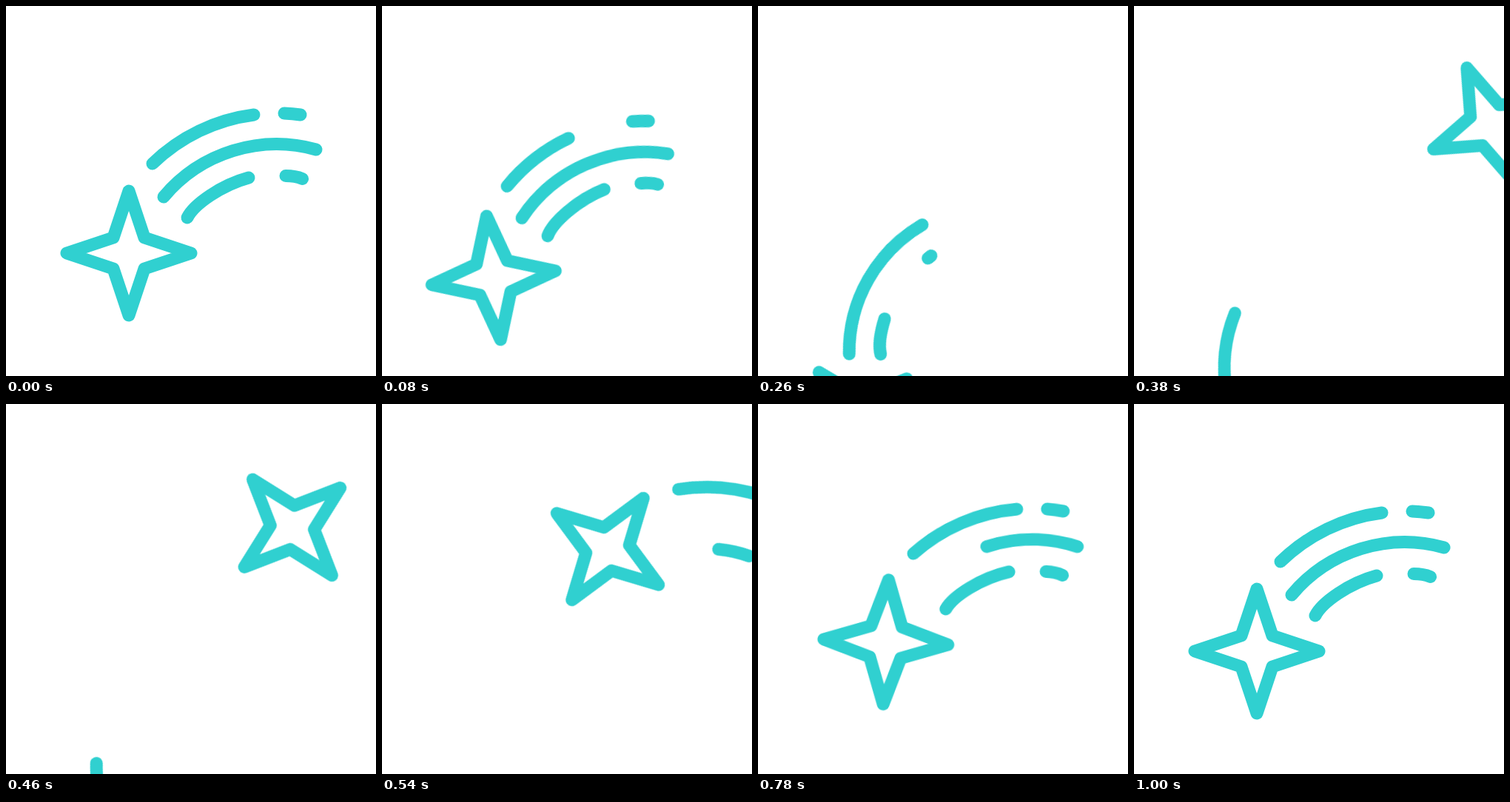
These frames come from a looping animation (500 px wide and 500 px high, 2000 ms). An HTML page:

```html
<!DOCTYPE html>
<html lang="en">
<head>
<meta charset="utf-8">
<title>Shooting star</title>
<style>
  html, body { margin: 0; width: 100%; height: 100%; overflow: hidden; background: #fff; }
  svg { display: block; width: 100%; height: 100%; }

  g, use {
    animation: 2s cubic-bezier(.333, 0, .667, 1) infinite;
  }
  g {
    transform-origin: 454px 485px;
    fill: none;
    stroke: #30d0d0;
    stroke-width: 17;
    stroke-linecap: round;
    stroke-linejoin: round;
  }
  /* One unit dash per path; the long gap lets a trail vanish completely. */
  .trail { stroke-dasharray: 1 2; }

  .leaving { animation-name: leave; }
  .leaving .outer { animation-name: leave-outer; }
  .leaving .outer-dash { animation-name: leave-outer-dash; }
  .leaving .inner { animation-name: leave-inner; }
  .leaving .inner-dash { animation-name: leave-inner-dash; }
  .leaving .middle { animation-name: leave-middle; }

  .arriving {
    animation-name: arrive;
    animation-timing-function: cubic-bezier(0, 0, .643, 1);
  }
  .arriving .outer { animation-name: arrive-outer; }
  .arriving .inner { animation-name: arrive-inner; }
  .arriving .middle {
    animation-name: arrive-middle;
    animation-timing-function: cubic-bezier(.35, 0, .565, 1);
  }

  @keyframes leave { 0% { transform: rotate(0deg); } 18%, 100% { transform: rotate(-50deg); } }
  @keyframes leave-outer { 0% { stroke-dashoffset: 0; } 11%, 100% { stroke-dashoffset: 1.02; } }
  @keyframes leave-outer-dash { 0%, 8% { stroke-dashoffset: 0; } 13%, 100% { stroke-dashoffset: 1.02; } }
  @keyframes leave-inner { 0%, 8% { stroke-dashoffset: 0; } 18%, 100% { stroke-dashoffset: 1.02; } }
  @keyframes leave-inner-dash { 0%, 9% { stroke-dashoffset: 0; } 15%, 100% { stroke-dashoffset: 1.02; } }
  @keyframes leave-middle { 0%, 10% { stroke-dashoffset: 0; } 28%, 100% { stroke-dashoffset: 1.02; } }

  @keyframes arrive { 0%, 12% { transform: rotate(100.5deg); } 42.3%, 100% { transform: rotate(0deg); } }
  @keyframes arrive-outer { 0%, 16% { stroke-dashoffset: -1.02; } 26%, 100% { stroke-dashoffset: 0; } }
  @keyframes arrive-inner { 0%, 22.5% { stroke-dashoffset: -1.02; } 32.5%, 100% { stroke-dashoffset: 0; } }
  @keyframes arrive-middle { 0%, 28% { stroke-dashoffset: -1.02; } 50%, 100% { stroke-dashoffset: 0; } }
</style>
</head>
<body>
<svg viewBox="0 0 500 500">
  <defs>
    <path id="star" d="M166 250 L187 313 L250 334 L187 355 L166 418 L145 355 L82 334 L145 313 Z"/>
    <path id="outer" pathLength="1" d="M198 213 A240 240 0 0 1 335 147"/>
    <path id="outer-dash" pathLength="1" d="M376 145 A240 240 0 0 1 398 147"/>
    <path id="middle" pathLength="1" d="M213 258 A199.3 199.3 0 0 1 419 194"/>
    <path id="inner" pathLength="1" d="M245 286 C254 268 291 242 328 232"/>
    <path id="inner-dash" pathLength="1" d="M378 229.5 Q391 229.5 400.5 233.5"/>
  </defs>
  <g class="leaving">
    <use href="#star"/>
    <use href="#outer" class="trail outer"/>
    <use href="#outer-dash" class="trail outer-dash"/>
    <use href="#middle" class="trail middle"/>
    <use href="#inner" class="trail inner"/>
    <use href="#inner-dash" class="trail inner-dash"/>
  </g>
  <g class="arriving">
    <use href="#star"/>
    <use href="#outer" class="trail outer"/>
    <use href="#outer-dash" class="trail"/>
    <use href="#middle" class="trail middle"/>
    <use href="#inner" class="trail inner"/>
    <use href="#inner-dash" class="trail"/>
  </g>
</svg>
</body>
</html>
```
